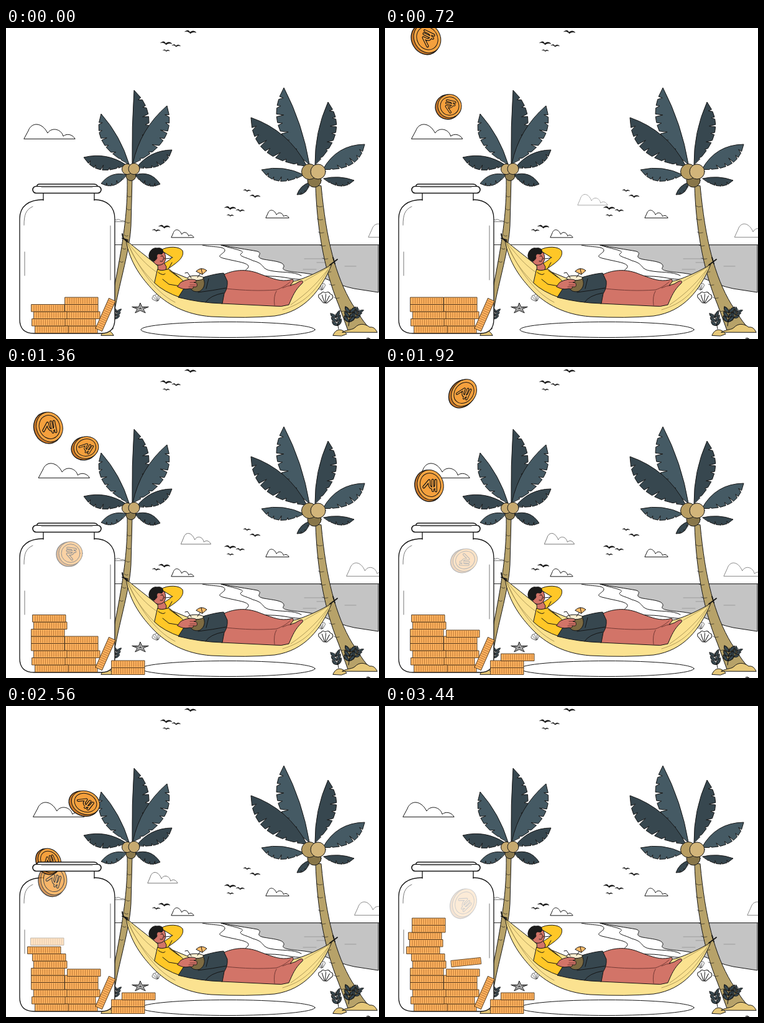
An HTML page for the animation above (3.52 s loop, 600x500 px).

```html
<!DOCTYPE html>
<html lang="en">
<head>
<meta charset="utf-8">
<title>Beach savings</title>
<style>
html, body { margin: 0; width: 100%; height: 100%; overflow: hidden; background: #fff; }
svg { display: block; width: 600px; height: 500px; }
</style>
</head>
<body>
<svg id="stage" viewBox="0 0 600 500" fill="none" stroke="#151515" stroke-width="1" stroke-linejoin="round" stroke-linecap="round"></svg>
<script>
const LOOP = 3520, STEP = 80;
const SLATE = '#455a64', DEEP = '#37474f', SKIN = '#d27468', SHIRT = '#ffc727', BARK = '#b7a269', SAND = '#e6c879';
const THIN = 'stroke="#7b6b37" stroke-width=".6"', CREASE = 'stroke="#743a35"';
const stage = document.getElementById('stage');

const path = (d, fill = 'none', extra = '') => `<path d="${d}" fill="${fill}" ${extra}/>`;
const ball = (x, y, r, fill) => `<circle cx="${x}" cy="${y}" r="${r}" fill="${fill}"/>`;
const clamp = v => Math.max(0, Math.min(1, v));
const mix = (a, b, u) => a.map((v, i) => v + (b[i] - v) * u);
const quad = (a, c, b, u) => mix(mix(a, c, u), mix(c, b, u), u);

// Smooth spine on one side, slit edge on the other; the sign of bend picks the side.
function leaf(bx, by, tx, ty, bend, fill) {
  const base = [bx, by], tip = [tx, ty], dx = tx - bx, dy = ty - by;
  const ctrl = (off, along) => [(bx + tx) / 2 - dy * off + dx * along, (by + ty) / 2 + dx * off + dy * along];
  const spine = ctrl(bend, 0), rim = ctrl(bend > 0 ? -.43 : .43, .12);
  const n = Math.round(2 + Math.hypot(dx, dy) / 22), pt = p => p.map(v => v.toFixed(1)).join(' ');
  let d = `M${pt(base)}Q${pt(spine)} ${pt(tip)}`;
  for (let i = 1; i <= n; i++) {
    const u = i / (n + 1), out = quad(tip, rim, base, u);
    const cut = mix(out, quad(tip, spine, base, u + .06), i % 2 ? .36 : .22);
    d += `L${pt(out)}L${pt(cut)}L${pt(quad(tip, rim, base, u + .035))}`;
  }
  return path(d + 'Z', fill);
}

function cloud(x, y, w, h, attr = '') {
  return `<g transform="translate(${x} ${y}) scale(${w / 82} ${h / 23})" ${attr}>` +
    path('M0 0L7 -13C12 -27 29 -27 38 -9C44 -19 60 -16 63 -4C69 -9 78 -7 82 0Z', '#fff', 'vector-effect="non-scaling-stroke"') + '</g>';
}

function bird(x, y, s = 1) {
  return `<g transform="translate(${x} ${y}) rotate(8) scale(${s})">` +
    path('M-9 1Q-4 -4 -1 1Q4 -4 9 0Q3 -1 0 3Q-4 -1 -9 1Z', '#151515', 'stroke-width=".5"') + '</g>';
}

// Three gulls around a lead bird.
const flock = (x, y) => bird(x, y) + bird(x + 16, y + 4, .75) + bird(x, y + 12, .6);

function plant(x, y, s, turn) {
  let g = path('M0 0Q1 -12 0 -26');
  for (let v = -6; v > -24; v -= 7) {
    g += path(`M0 ${v}q-9 -1 -8 -9q7 2 8 9q8 -2 8 -10q-7 2 -8 10`, DEEP);
  }
  return `<g transform="translate(${x} ${y}) rotate(${turn}) scale(${s})">${g}</g>`;
}

function shell(x, y, s, turn) {
  return `<g transform="translate(${x} ${y}) rotate(${turn}) scale(${s})">` +
    path('M-3 8L-11 0Q-13 -5 -8 -6Q-6 -11 -1 -8Q4 -12 7 -7Q13 -6 11 0L3 8ZM-1 8L-6 -4M0 8V-6M1 8L6 -4', '#fff') + '</g>';
}

function starfish(x, y) {
  let rim = 'M', rays = '';
  for (let i = 0; i < 10; i++) {
    const a = (i / 5 - .5) * Math.PI, r = i % 2 ? 5 : 14;
    const dx = Math.cos(a) * r, dy = Math.sin(a) * r * .62;
    rim += `${x + dx} ${y + dy} `;
    if (i % 2 === 0) rays += `M${x} ${y}l${dx * .6} ${dy * .6}`;
  }
  return path(rim + 'Z', '#c6c6c6') + path(rays, 'none', 'stroke-width=".6"');
}

function sea() {
  return path('M346 349C365 353 388 356 404 359C416 363 397 368 415 372C433 375 448 376 447 384C440 391 462 392 480 394C513 398 526 412 560 419L599 425V349Z', '#c4c4c4') +
    path('M316 349C330 353 353 350 352 358C350 364 334 367 353 371C373 376 395 378 389 386C377 394 398 398 424 399C449 399 459 405 478 404') +
    path('M346 349C367 356 386 358 379 362C372 367 388 369 397 374C417 379 410 387 425 390C444 394 462 391 475 398') +
    path('M480 371h48M500 377h28M478 388h21M545 383h18', 'none', 'stroke="#8c8c8c" stroke-width=".7"') +
    path('M174 348.5H600', 'none', 'stroke="#333"');
}

function backdrop() {
  return cloud(165, 311, 26, 5, 'stroke="#777"') + cloud(418, 305, 37, 12) + cloud(266, 336.5, 36, 12) +
    bird(297, 6) + flock(258, 24) + flock(361, 289) + bird(388, 261, .65) + bird(401, 270, .9) + bird(255, 319) + bird(242, 325, .7) +
    sea() + '<ellipse cx="357" cy="485" rx="140" ry="12.5" fill="#fff"/>' +
    starfish(216, 451) + shell(242, 434, .6, -20) + shell(507, 416, .6, -15) + shell(514, 434, 1, 5);
}

// Bark marks along a leaning trunk.
function rings(x, y, lean, n, w) {
  let d = '';
  for (let i = 0; i < n; i++) d += `M${x + lean * i * i / n} ${y + i * 21}q${w / 2} 3 ${w} 1`;
  return path(d, 'none', 'stroke-width=".6"');
}

function leftPalm() {
  return path('M195 242C196 300 188 355 160 484H172C171 445 199 366 201 318L203 242Z', BARK) + rings(195, 270, -3, 6, 6) +
    leaf(203, 218, 206, 100, -.02, DEEP) + leaf(198, 219, 153, 138, .11, SLATE) + leaf(204, 218, 259, 125, -.17, SLATE) +
    leaf(193, 220, 125, 208, .22, DEEP) + leaf(210, 224, 267, 196, -.24, DEEP) +
    leaf(194, 236, 153, 250, .33, SLATE) + leaf(208, 236, 248, 251, -.37, DEEP) +
    ball(201, 237.5, 8, '#8d7b4e') + ball(195, 227, 8.5, '#c7aa70') + ball(206, 226.5, 9, '#c7aa70');
}

function rightPalm() {
  return path('M498 254C500 315 510 385 535 445L550 486H589C574 474 568 459 557 444C530 399 515 340 507 254Z', BARK) + rings(500, 286, 5, 9, 9) +
    leaf(488, 219, 447, 96, .08, SLATE) + leaf(497, 220, 518, 119, -.11, DEEP) + leaf(484, 222, 394, 144, .2, DEEP) +
    leaf(510, 227, 577, 187, -.29, SLATE) + leaf(479, 236, 411, 228, .18, SLATE) +
    leaf(511, 242, 560, 245, -.15, DEEP) + leaf(489, 248, 468, 268, .26, DEEP) +
    ball(496, 245, 11, '#887649') + ball(488, 231, 12.5, '#b89d62') + ball(502, 231, 12, '#d2b57a');
}

function hammock() {
  return path('M193 341C199 378 219 403 237 422C258 444 289 461 330 464Q388 467 432 463C481 456 507 421 524 380C506 391 486 400 468 406L350 426L245 383C226 367 208 354 193 341Z', '#fbe290') +
    path('M193 341C207 374 221 392 239 410M193 341C216 371 227 382 243 393M196 345C211 382 238 424 272 441', 'none', THIN) +
    path('M524 380C503 408 486 426 458 445M520 384L480 407M518 389C496 427 478 443 445 453', 'none', THIN) +
    path('M187 331C187 337 190 340 196 344M187 338L196 341M521 381L533 372M526 369L529 379', 'none', 'stroke-width="1.8"');
}

function torso() {
  return path('M249 357C261 350 279 351 284 358C288 370 272 379 258 389L251 381C256 377 264 373 267 369Z', SHIRT) +
    path('M253 371Q264 371 268 369M262 386L267 377') +
    path('M244 375L251 372L258 384L257 391H245Z', SKIN) +
    path('M244 388C253 393 260 385 264 389L280 402C291 410 288 421 282 434Q253 424 239 410Z', SHIRT) +
    path('M245 393Q253 399 256 395M252 404L262 412L280 415M263 390L278 401');
}

function head() {
  return path('M235 364C235 378 242 384 251 380C257 377 258 370 255 361L244 359Z', SKIN) +
    path('M231 371C227 362 235 352 243 354C251 352 256 359 250 364C246 362 241 363 243 370C239 376 236 376 234 373Z', '#1b1b1b') +
    path('M249 367l3 -1M252 367l3 4l-3 1M248 375q3 1 5 -1M241 370q-4 -1 -2 4');
}

function legs() {
  return path('M351 396C369 388 389 387 410 396C432 404 442 408 457 405Q463 402 462 408L457 414Q466 412 471 408C476 405 480 407 476 411C465 421 461 431 455 445Q443 449 430 447L347 443Z', SKIN) +
    path('M353 419C385 422 407 423 435 421C444 418 452 413 457 408M435 423Q430 431 432 446M445 418Q453 414 459 414', 'none', CREASE) +
    path('M310 403C323 399 337 395 350 394L356 407Q357 418 351 427L348 443Q312 442 277 433L286 419Z', DEEP) +
    path('M309 425Q333 422 354 418M321 441Q328 430 350 426M326 403L322 419');
}

function drink() {
  return path('M294 405C293 421 302 426 312 423C320 418 321 409 317 402Z', '#7d6b42') +
    '<ellipse cx="305" cy="402" rx="13" ry="3.8" fill="#f8edcf"/>' +
    path('M298 402L292 393L288 394M308 401L315 391') + path('M306 391Q314 383 323 390L316 396Z', '#ffbd69') + path('M314 387L316 396') +
    path('M281 409C289 404 298 403 305 405Q308 408 302 409Q309 410 307 413Q309 417 301 416Q303 420 295 419C287 421 282 419 276 416Z', SKIN) +
    path('M296 409h7M296 413h9M294 416h7', 'none', CREASE);
}

function ground() {
  return path('M153 494C157 483 166 482 173 494Z', SAND) + plant(174, 472, .75, 15) +
    path('M526 494C531 482 541 483 548 492L540 495Z', SAND) +
    path('M541 489C550 484 557 486 562 481C570 473 580 477 585 481C592 480 595 485 597 489Z', SAND) +
    plant(535, 484, .95, -12) + plant(551, 479, 1.05, 6) + plant(559, 470, .75, 30) +
    path('M580 499Q583 497 586 500', '#151515');
}

function jar() {
  return path('M60 276C37 276 22 286 22 307V468Q22 491 45 491H153Q175 491 175 468V307C175 287 162 276 142 276', '#fff', 'stroke-width="1.3"') +
    path('M60 266V277M142 266V277', 'none', 'stroke-width="1.3"') +
    path('M43 287C32 292 29 300 29 317M168 318V405M30 360V398', 'none', 'stroke="#555" stroke-width=".8"');
}

function lid() {
  return '<rect x="43" y="254.5" width="110" height="11" rx="5.5" fill="#fff" stroke-width="1.6"/>' +
    path('M50 254Q50 251 54 251H141Q146 251 147 254', '#fff', 'stroke-width="1.5"') +
    path('M57 256.5H139', 'none', 'stroke="#777" stroke-width=".7"');
}

const SLAB_W = 53, SLAB_H = 11.5;
function slab(x, y) {
  let d = '';
  for (let i = 4; i < SLAB_W - 1; i += 3.5) d += `M${x + i} ${y + 1.5}v${SLAB_H - 3}`;
  return `<rect x="${x}" y="${y}" width="${SLAB_W}" height="${SLAB_H}" fill="#ffb35f" stroke="#4a3218" stroke-width=".9"/>` +
    path(d, 'none', 'stroke="#a9672b" stroke-width=".8"');
}

function turnedSlab(x, y, turn, s = 1) {
  return `<g transform="translate(${x} ${y}) rotate(${turn}) scale(${s})">${slab(-SLAB_W / 2, -SLAB_H / 2)}</g>`;
}

function landing(x, y, at, t) {
  const u = clamp((t - at) / 160);
  return u ? `<g opacity="${u}" transform="translate(0 ${4 * (u - 1)})">${slab(x, y)}</g>` : '';
}

// Left edges by level, bottom up, then landing times of the rising column.
const column = [47, 42, 45, 41, 41, 41, 45, 43, 35, 40, 38, 44, 44];
const rises = [480, 880, 1040, 1200, 2380, 2500, 2640, 2800, 2800];
const level = n => 479 - SLAB_H * n;

function pile(t) {
  let s = [94, 91, 98, 95, 95].map((x, n) => slab(x, level(n))).join('');
  column.forEach((x, n) => s += landing(x, level(n), n < 4 ? -LOOP : rises[n - 4], t));
  s += landing(170, 483, 960, t) + landing(170, 472, 1120, t) + landing(187, 461, 1680, t) + landing(99, 423, 1740, t);
  s += turnedSlab(160, 461, -66);
  const u = (t - 3280) / 160;
  if (u > 0) s += `<g opacity="${clamp(u)}">${turnedSlab(130.5, 404 + 8 * u, -10 + 4 * u, .9)}</g>`;
  return s;
}

// Straight runs between keys, carried on past both ends.
function sample(keys, t) {
  let i = 1;
  while (i < keys.length - 1 && keys[i][0] <= t) i++;
  const a = keys[i - 1], b = keys[i];
  return mix(a, b, (t - a[0]) / (b[0] - a[0]));
}

const RUPEE = 'M-7 -9H8M-7 -4H8M-7 -9H-2C7 -9 7 2 -2 2H-6L4 11';

// Key: time, x, y, tilt, mark angle.
function coin(rx, ry, keys, t) {
  const [, x, y, tilt, turn] = sample(keys, t), opacity = clamp(1 - (y - 265) / 65);
  if (y < -28 || !opacity) return '';
  const oval = (dx, dy, s, fill, w) => `<ellipse cx="${dx}" cy="${dy}" rx="${rx * s}" ry="${ry * s}" fill="${fill}" stroke-width="${w}"/>`;
  const a = -tilt * Math.PI / 180, ex = -2 * Math.cos(a) - Math.sin(a), ey = Math.cos(a) - 2 * Math.sin(a);
  return `<g transform="translate(${x} ${y}) rotate(${tilt})" opacity="${opacity}">` +
    oval(ex, ey, 1, '#c9792b', 1.3) + oval(-ex / 2, -ey / 2, .95, '#fba643', 1) + oval(-ex / 2, -ey / 2, .75, '#f5a03d', 1) +
    `<g transform="translate(${-ex / 2} ${-ey / 2}) scale(${rx / 23} ${ry / 23}) rotate(${turn - tilt})">` +
    path(RUPEE, 'none', 'stroke-width="4.4"') + path(RUPEE, 'none', 'stroke="#fba643" stroke-width="2"') + '</g></g>';
}

const longFall = [[720, 67, 17, -30, 22], [1360, 69, 97, -20, 80], [1920, 72, 190, -15, 92], [2240, 74, 235, -10, 100]];
const tumble = [[1920, 126, 42, 38, 110], [2240, 127, 95, 72, 145], [2880, 127, 217, 152, 105], [3440, 127, 317, 205, 140]];

function coins(t) {
  return coin(22, 25.5, longFall, t) +
    coin(20, 19.7, [[720, 103, 126, 10, 14], [1360, 103, 300, 0, 8]], t) +
    coin(21, 18.5, [[880, 128, -25, 0, 60], [1360, 128, 130, -12, 118]], t) +
    coin(19.5, 24.5, tumble, t) +
    coin(18, 22, [[1960, 67, -25, -10, -10], [2240, 68, 103, -22, 28]], t);
}

const drift = [[0, 0], [720, .535], [1360, .915], [1760, 1], [1920, .985], [2240, .85], [2880, .31], [3200, .08], [3440, 0], [LOOP, 0]];

stage.innerHTML = '<g id="sky"></g>' + backdrop() + leftPalm() + rightPalm() + hammock() +
  torso() + head() + legs() + drink() + ground() + jar() + '<g id="money"></g>' + lid();
const sky = document.getElementById('sky'), money = document.getElementById('money');

function draw(t) {
  const p = sample(drift, t)[1];
  const fade = clamp((t - 320) / 640) * clamp((3440 - t) / 720);
  sky.innerHTML = cloud(29 + 25.5 * p, 178, 82, 23) + cloud(583 - 38.5 * p, 336, 64, 21, 'stroke="#888"') +
    cloud(310 - .0446 * (t - 720), 284.5, 48, 17, `stroke="#777" opacity="${fade}"`);
  money.innerHTML = pile(t) + coins(t);
}

const start = performance.now();
let last = -1;
function tick() {
  const t = Math.floor(((performance.now() - start) % LOOP) / STEP) * STEP;
  if (t !== last) draw(last = t);
  requestAnimationFrame(tick);
}
tick();
</script>
</body>
</html>
```
